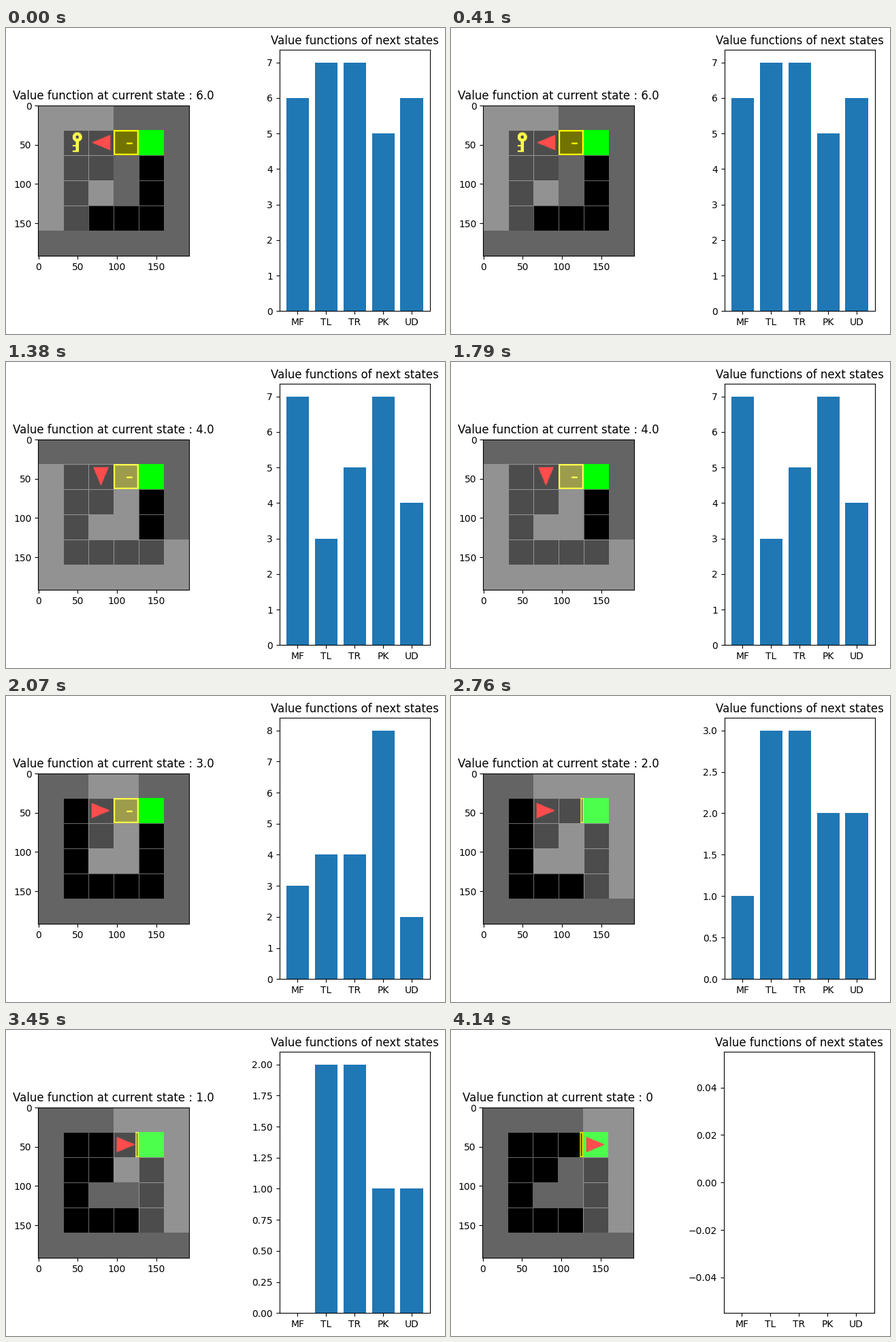
A matplotlib script for the animation above (4.83 s loop, 645 px wide and 450 px high).

```python
import numpy as np
import matplotlib.pyplot as plt
from matplotlib.animation import FuncAnimation

W, H = 645, 450
TILE, SUB = 32, 3
ACTIONS = ["MF", "TL", "TR", "PK", "UD"]
WALLS = {(2, 3), (3, 2), (3, 3)}
DOOR, GOAL, KEY = (3, 1), (4, 1), (1, 1)
YELLOW = np.array([255, 255, 0])

RIGHT, DOWN, LEFT = 0, 1, 2
WEST_VIEW = ["012", "012", "012", "012", "01", ""]

# value, agent column, heading, has key, door open, visible columns per row, next values
STEPS = [
    ("6.0", 2, LEFT, False, False, WEST_VIEW, [6, 7, 7, 5, 6]),
    ("5.0", 2, LEFT, True, False, WEST_VIEW, [6, 4, 4, 6, 5]),
    ("4.0", 2, DOWN, True, False,
     ["", "0123", "0123", "0123", "012345", "012345"], [7, 3, 5, 7, 4]),
    ("3.0", 2, RIGHT, True, False, ["23"] * 4 + ["", ""], [3, 4, 4, 8, 2]),
    ("2.0", 2, RIGHT, True, True, ["2345"] * 4 + ["45", ""], [1, 3, 3, 2, 2]),
    ("1.0", 3, RIGHT, True, True, ["345"] * 3 + ["45", "45", ""], [0, 2, 2, 1, 1]),
    ("0", 4, RIGHT, True, True, ["45"] * 5 + [""], [0, 0, 0, 0, 0]),
]

# sample points inside one unit tile
n = TILE * SUB
X, Y = np.meshgrid((np.arange(n) + 0.5) / n, (np.arange(n) + 0.5) / n)


def rect(x0, x1, y0, y1):
    return (X >= x0) & (X <= x1) & (Y >= y0) & (Y <= y1)


def circle(cx, cy, r):
    return (X - cx) ** 2 + (Y - cy) ** 2 <= r * r


def draw_key(img):
    img[circle(0.56, 0.28, 0.19)] = YELLOW
    img[rect(0.50, 0.63, 0.31, 0.88)] = YELLOW
    img[rect(0.38, 0.50, 0.59, 0.66)] = YELLOW
    img[rect(0.38, 0.50, 0.81, 0.88)] = YELLOW
    img[circle(0.56, 0.28, 0.064)] = 0


def draw_door(img, is_open):
    if is_open:
        img[rect(0.88, 1, 0, 1)] = YELLOW
        img[rect(0.92, 0.96, 0.04, 0.96)] = 0
    else:
        img[:] = YELLOW
        img[rect(0.06, 0.94, 0.06, 0.94)] = 0.45 * YELLOW
        img[rect(0.52, 0.75, 0.50, 0.56)] = YELLOW


def draw_agent(img, heading):
    c, s = [(1, 0), (0, 1), (-1, 0)][heading]
    dx, dy = X - 0.5, Y - 0.5
    u = 0.5 + dx * c + dy * s
    v = dy * c - dx * s
    img[(u >= 0.12) & (np.abs(v) <= 0.31 * (0.87 - u) / 0.75)] = (255, 0, 0)


def draw_tile(cell, step):
    _, col, heading, has_key, is_open, view, _ = step
    x, y = cell
    img = np.zeros((n, n, 3))
    img[rect(0, 0.031, 0, 1) | rect(0, 1, 0, 0.031)] = 100
    if x in (0, 5) or y in (0, 5) or cell in WALLS:
        img[:] = 100
    elif cell == GOAL:
        img[:] = (0, 255, 0)
    elif cell == DOOR:
        draw_door(img, is_open)
    elif cell == KEY and not has_key:
        draw_key(img)
    if cell == (col, 1):
        draw_agent(img, heading)
    if str(x) in view[y]:
        img += 0.3 * (255 - img)
    return img.reshape(TILE, SUB, TILE, SUB, 3).mean(axis=(1, 3))


def draw_grid(step):
    rows = [np.hstack([draw_tile((x, y), step) for x in range(6)]) for y in range(6)]
    return np.vstack(rows).astype(np.uint8)


GRIDS = [draw_grid(step) for step in STEPS]

fig = plt.figure(figsize=(W / 100, H / 100), dpi=100)
ax_map = fig.add_axes([0.1, 0.1, 0.3, 0.8])
ax_bar = fig.add_axes([0.6, 0.1, 0.3, 0.8])
AX_W, AX_H, BOTTOM = 576 / 2.6, 384, 33.7


def update(i):
    value, values = STEPS[i][0], STEPS[i][-1]
    done = i == len(STEPS) - 1
    left = 46.12 if done else 47.12
    for ax, x in ((ax_map, left), (ax_bar, left + 1.6 * AX_W)):
        ax.clear()
        ax.set_position([x / W, BOTTOM / H, AX_W / W, AX_H / H])
    ax_map.imshow(GRIDS[i])
    ax_map.set_title(f"Value function at current state : {value}")
    ax_bar.bar(ACTIONS, values)
    ax_bar.set_title("Value functions of next states")
    if done:
        ax_bar.set_ylim(-0.055, 0.055)
    return []


anim = FuncAnimation(fig, update, frames=len(STEPS), init_func=lambda: [],
                     interval=690, repeat=True, repeat_delay=0)
plt.show()
```
